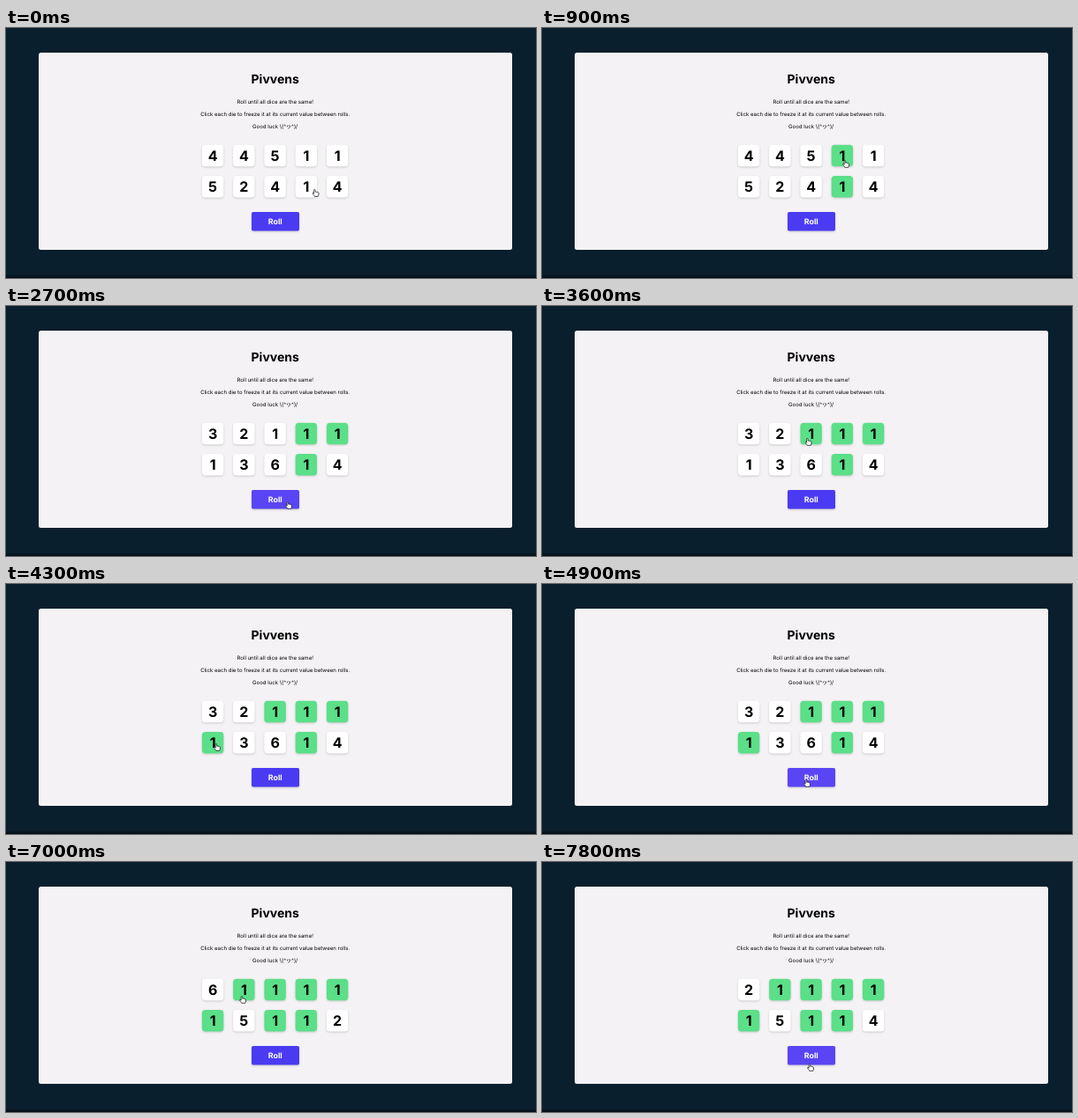
An HTML page that plays this animation: 600 by 284 pixels, repeating every 8 s.

```html
<!DOCTYPE html>
<html lang="en">
<head>
<meta charset="utf-8">
<title>Dice game</title>
<style>
  html, body { margin: 0; width: 100%; height: 100%; overflow: hidden; background: #0a1f2d; }
  svg { display: block; width: 600px; height: 284px; }
  text {
    font-family: Inter, "Noto Sans CJK JP", "Noto Sans", sans-serif;
    text-anchor: middle;
    text-rendering: geometricPrecision;
  }
  .title { font-size: 14px; font-weight: 700; }
  .info { font-size: 6.05px; }
  .digit { font-size: 16px; font-weight: 700; }
  .label { font-size: 8.9px; font-weight: 700; fill: #fff; }
  .raised { filter: drop-shadow(0 1px 1px rgba(0, 0, 0, .17)); }
</style>
</head>
<body>
<svg viewBox="0 0 600 284">
  <defs>
    <linearGradient id="shade" x2="0" y2="1">
      <stop offset="0" stop-color="#02080d" stop-opacity="0"/>
      <stop offset="1" stop-color="#02080d" stop-opacity=".8"/>
    </linearGradient>
  </defs>
  <rect width="600" height="284" fill="#0a1f2d"/>
  <rect y="280" width="600" height="4" fill="url(#shade)"/>
  <rect x="37" y="28" width="536" height="224" rx="2.5" fill="#f4f2f5"/>
  <text class="title" x="304.7" y="63">Pivvens</text>
  <text class="info" x="304.7" y="85.7">Roll until all dice are the same!</text>
  <text class="info" x="304.7" y="99.6">Click each die to freeze it at its current value between rolls.</text>
  <text class="info" x="304.7" y="113.5">Good luck \(^ヮ^)/</text>
  <g id="dice"></g>
  <rect id="button" class="raised" x="278" y="209" width="54" height="21.5" rx="1.8"/>
  <text class="label" x="304.8" y="223.1">Roll</text>
  <g id="cursor" stroke-linejoin="round">
    <path id="hand" transform="translate(0 .5) scale(.86)" fill="#fff" stroke="#111" stroke-width=".85"
      d="M-1 .9a.9.9 0 0 1 1.8 0V3.2C1.2 2.7 2.3 2.8 2.5 3.5 3 3 3.9 3.2 4 3.9 4.6 3.6 5.2 3.9 5.2 4.7V6.4C5.2 7.4 4.6 8 4.5 9.1H-.2C-.4 8-2.3 6.6-2.8 5.2-3 4.4-2 4-1.4 4.8L-1 5.4Z"/>
    <path id="arrow" fill="#000" stroke="#fff" stroke-width=".6"
      d="M0 0V7.4L1.7 5.8 2.9 8.5 4.1 8 2.9 5.4H5.3Z"/>
  </g>
</svg>
<script>
const LOOP = 8000, STEP = 100, DIE = 24.4, PITCH = 35.25;
const SETTLE = 200, LINGER = 150; // rest before and after each click
const $ = id => document.getElementById(id);

// Dice shown at the start and after each roll
const rolls = ['4451152414', '3211113614', '6111115112', '2111115114'];

// Clicks; what each one does depends on what lies under it
const clicks = [
  [100, 349.5, 183], [900, 343, 150], [1600, 371.5, 147], [2700, 319, 222],
  [3600, 300.5, 150], [4200, 238, 181], [5100, 299, 222], [5900, 303, 181],
  [6400, 271, 162], [6900, 267, 152], [7600, 303, 229]
].map(([time, x, y]) => ({ time, x, y }));

const button = { x: 305, y: 219.75, w: 54, h: 21.5 };
const dice = Array.from({ length: 10 }, (_, i) => {
  const x = 234.1 + i % 5 * PITCH, y = 145 + Math.floor(i / 5) * PITCH;
  $('dice').insertAdjacentHTML('beforeend',
    `<rect class="raised" x="${x - DIE / 2}" y="${y - DIE / 2}" width="${DIE}" height="${DIE}" rx="3.8"/>
     <text class="digit" x="${x}" y="${y + 5.8}"></text>`);
  const digit = $('dice').lastElementChild;
  return { x, y, w: DIE, h: DIE, digit, face: digit.previousElementSibling };
});

const hits = (point, box) =>
  Math.abs(point.x - box.x) <= box.w / 2 && Math.abs(point.y - box.y) <= box.h / 2;

function pointerAt(t) {
  const next = clicks.find(click => click.time + LINGER > t) || clicks[clicks.length - 1];
  const last = clicks[clicks.indexOf(next) - 1] || next;
  const leave = last.time + LINGER, arrive = next.time - SETTLE;
  const p = Math.min(1, Math.max(0, (t - leave) / (arrive - leave)));
  const ease = p * p * (3 - 2 * p);
  return { x: last.x + (next.x - last.x) * ease, y: last.y + (next.y - last.y) * ease };
}

function draw(now) {
  const t = Math.floor(now % LOOP / STEP) * STEP;
  const pointer = pointerAt(t);
  const done = clicks.filter(click => click.time <= t);
  const values = rolls[done.filter(click => hits(click, button)).length];
  dice.forEach((die, i) => {
    const frozen = done.some(click => hits(click, die));
    die.digit.textContent = values[i];
    die.face.setAttribute('fill', frozen ? '#5bdf88' : '#fff');
  });
  const overButton = hits(pointer, button);
  const clickable = overButton || dice.some(die => hits(pointer, die));
  $('button').setAttribute('fill', overButton ? '#5a45f5' : '#4a3af2');
  $('hand').style.display = clickable ? '' : 'none';
  $('arrow').style.display = clickable ? 'none' : '';
  $('cursor').setAttribute('transform', `translate(${pointer.x} ${pointer.y})`);
}

const start = performance.now();
function tick() {
  draw(performance.now() - start);
  requestAnimationFrame(tick);
}
tick();
</script>
</body>
</html>
```
